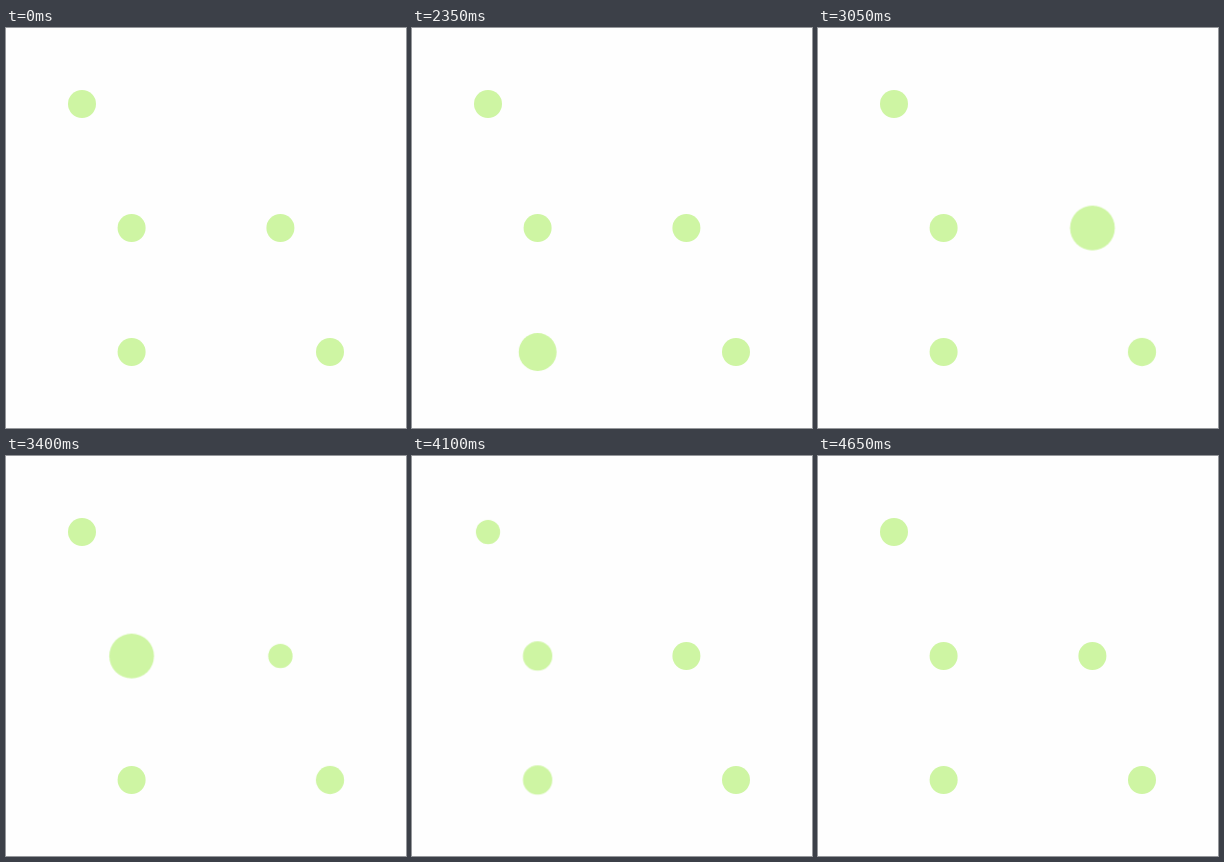
Recreate the animation shown at these times as an HTML page. Size 400x400 px, loop 4.7 s.

```html
<!DOCTYPE html>
<html lang="en">
<head>
<meta charset="utf-8">
<title>Pulsing dots</title>
<style>
  html, body { margin: 0; width: 100%; height: 100%; overflow: hidden; background: #fefefe; }
  svg { display: block; width: 100vw; height: 100vh; }
  circle { r: 14px; fill: #cef5a3; }
  .pulse {
    transform-box: fill-box;
    transform-origin: center;
    animation: pulse 4700ms var(--at) infinite;
  }
  /* One second of swing: a big arc up, a short dip, a faint rebound, then rest. */
  @keyframes pulse {
    0%       { transform: scale(1);    animation-timing-function: cubic-bezier(.39, .575, .565, 1); }
    4.255%   { transform: scale(1.6);  animation-timing-function: cubic-bezier(.47, 0, .745, .715); }
    9.787%   { transform: scale(1);    animation-timing-function: cubic-bezier(.39, .575, .565, 1); }
    11.489%  { transform: scale(.857); animation-timing-function: cubic-bezier(.47, 0, .745, .715); }
    13.191%  { transform: scale(1);    animation-timing-function: cubic-bezier(.39, .575, .565, 1); }
    17.234%  { transform: scale(1.06); animation-timing-function: cubic-bezier(.47, 0, .745, .715); }
    21.277%, 100% { transform: scale(1); }
  }
</style>
</head>
<body>
<svg viewBox="0 0 400 400">
  <circle class="pulse" style="--at: 3580ms" cx="76" cy="76" r="14"/>
  <circle class="pulse" style="--at: 3215ms" cx="125.6" cy="200" r="14"/>
  <circle class="pulse" style="--at: 2840ms" cx="274.4" cy="200" r="14"/>
  <circle class="pulse" style="--at: 2419ms" cx="324" cy="324" r="14"/>
  <!-- This dot pulses twice per loop. -->
  <g class="pulse" style="--at: 3657ms">
    <circle class="pulse" style="--at: 1997ms" cx="125.6" cy="324" r="14"/>
  </g>
</svg>
</body>
</html>
```
